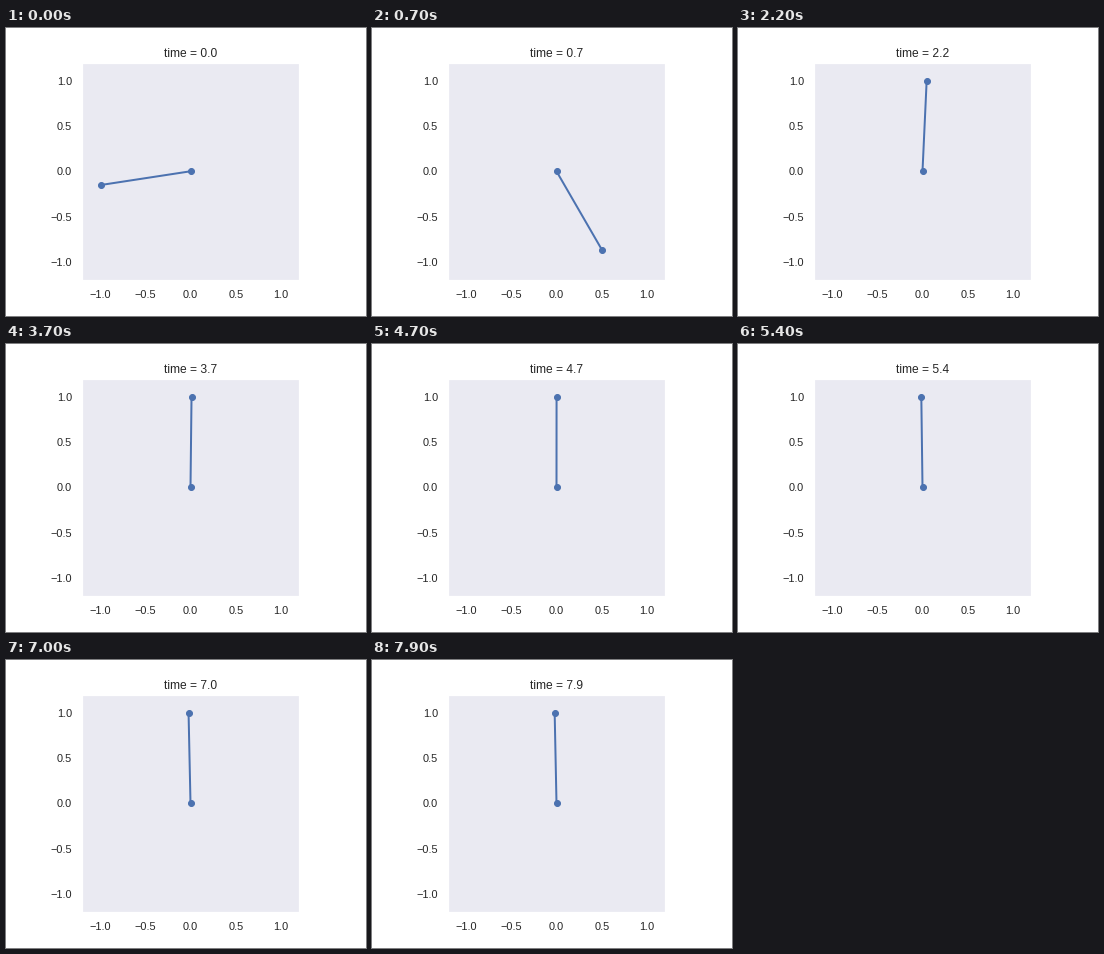
Recreate the animation shown at these times as a matplotlib script. Size 360 by 288 pixels, loop 8000 ms.

```python
import numpy as np
import matplotlib.pyplot as plt
from matplotlib.animation import FuncAnimation

FRAMES, STEP = 80, 0.1
GRAVITY, TORQUE = 9.8, 2.8
SWING_END = 14

plt.rcParams.update({
    "font.family": "Liberation Sans",
    "text.color": "#262626",
    "xtick.color": "#262626",
    "ytick.color": "#262626",
})


def swing(n, start=-1.419, speed=-1.2):
    """Angles from the hanging position under a constant torque."""
    angles, move = [start], speed * STEP
    for i in range(n - 1):
        accel = TORQUE - GRAVITY * np.sin(angles[-1])
        move += accel * STEP**2 * (0.5 if i == 0 else 1)
        angles.append(angles[-1] + move)
    return angles


def settle(k):
    """Angle while the controller holds the pendulum upright."""
    t = k * STEP
    s = t - SWING_END * STEP
    lean = 0.25 * np.exp(-6 * s) + 0.09 * np.exp(-0.9 * s)
    lean -= 0.019 / (1 + np.exp((5.05 - t) / 0.12))
    if t > 4.55:
        lean += 0.003 * np.cos(2.2 * k)
    return np.pi - lean


angles = swing(SWING_END) + [settle(k) for k in range(SWING_END, FRAMES)]

fig = plt.figure(figsize=(5, 4), dpi=72, facecolor="white")
fig.subplots_adjust(left=0.125, right=0.9, bottom=0.125, top=0.88)
ax = fig.add_subplot(facecolor="#EAEAF2")
ax.set(xlim=(-1.2, 1.2), ylim=(-1.2, 1.2), aspect="equal")
ax.set_xticks(np.arange(-1, 1.1, 0.5))
ax.set_yticks(np.arange(-1, 1.1, 0.5))
ax.tick_params(length=6, pad=3.5, labelsize=11, bottom=False, left=False)
for spine in ax.spines.values():
    spine.set(color="white", linewidth=1.25)

rod, = ax.plot([], [], "o-", color="#4C72B0", lw=2, ms=6,
               solid_capstyle="round")
title = ax.set_title("", fontsize=12, pad=6)


def draw(k):
    a = angles[k]
    rod.set_data([0, np.sin(a)], [0, -np.cos(a)])
    title.set_text(f"time = {k * STEP:.1f}")
    return rod, title


anim = FuncAnimation(fig, draw, frames=FRAMES, interval=100,
                     repeat=True, repeat_delay=0, blit=False)
plt.show()
```
